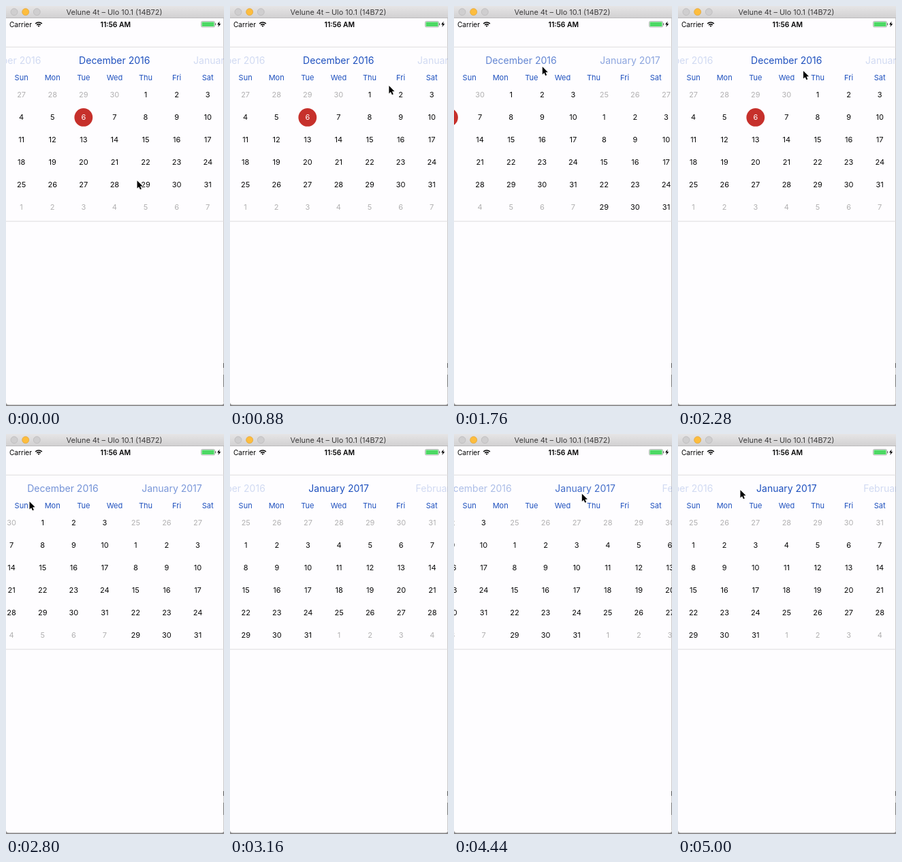
Recreate the animation shown at these times as an HTML page with a canvas. Size 320x587 px, loop 5040 ms.

```html
<!DOCTYPE html>
<html lang="en">
<head>
<meta charset="utf-8">
<title>Calendar paging</title>
<style>
html, body { margin: 0; width: 100%; height: 100%; overflow: hidden; background: #fefdff; }
canvas { display: block; width: 320px; height: 587px; }
</style>
</head>
<body>
<canvas id="stage" width="320" height="587"></canvas>
<script>
const ctx = document.getElementById('stage').getContext('2d');
const LOOP = 5040, STEP = 40, PAGE = 319, TITLE_GAP = 160;
const BLUE = '#1e50be', PAPER = '#fefdff', RULE = '#dddcde';
const WEEKDAYS = ['Sun', 'Mon', 'Tue', 'Wed', 'Thu', 'Fri', 'Sat'];
const MONTHS = ['November', 'December', 'January', 'February'];

const linear = u => u;
const settle = u => 1 - (1 - u) ** 3;
const smooth = u => u * u * (3 - 2 * u);

// Keys: [time, value(s)..., easing towards this key]
const scrollKeys = [
  [0, 0], [1180, 0], [1480, 131, linear], [1620, 155, settle],
  [1950, 68, smooth], [2240, 0, settle], [2340, 0],
  [2800, 151.3, linear], [2880, 199, linear], [3220, PAGE, settle],
  [4000, PAGE], [4080, 293, linear], [4300, 210, settle],
  [4680, 349, smooth], [4960, PAGE, settle], [LOOP, PAGE]
];
const cursorKeys = [
  [0, 192, 255], [560, 205, 162, smooth], [1120, 251, 86, smooth],
  [1180, 251, 86], [1480, 119, 84, linear], [1620, 95, 84, settle],
  [1950, 183.5, 94, smooth], [2340, 183.5, 94],
  [2800, 34, 98, linear], [2900, -14, 104, linear],
  [3200, -14, 112], [3380, 14, 114, linear], [3700, 184, 90, smooth],
  [3960, 121, 87, smooth], [4000, 121, 87], [4080, 147, 88, linear],
  [4300, 230, 89, settle], [4680, 91, 81, smooth], [LOOP, 91, 81]
];

function sample(keys, t, index = 1) {
  const i = Math.max(1, keys.findIndex(k => k[0] >= t));
  const a = keys[i - 1], b = keys[i];
  const last = b[b.length - 1];
  const ease = typeof last === 'function' ? last : linear;
  return a[index] + (b[index] - a[index]) * ease((t - a[0]) / (b[0] - a[0]));
}

function buildMonth(n) {
  const month = 10 + n;
  const lead = new Date(2016, month, 1).getDay() || 7;
  const days = Array.from({ length: 42 }, (_, i) => {
    const date = new Date(2016, month, 1 - lead + i);
    return {
      label: date.getDate(),
      inside: date.getMonth() === month % 12,
      today: date.getFullYear() === 2016 && date.getMonth() === 11 && date.getDate() === 6
    };
  });
  return { name: MONTHS[n] + ' ' + (month < 12 ? 2016 : 2017), days };
}
const months = MONTHS.map((_, n) => buildMonth(n));

function text(str, x, y, size, color, weight = 400, align = 'center') {
  ctx.font = `${weight} ${size}px Inter, sans-serif`;
  ctx.textAlign = align;
  ctx.fillStyle = color;
  ctx.fillText(str, x, y);
}

function rect(x, y, w, h, color) {
  ctx.fillStyle = color;
  ctx.fillRect(x, y, w, h);
}

function disc(x, y, r, fill, stroke) {
  ctx.beginPath();
  ctx.arc(x, y, r, 0, Math.PI * 2);
  ctx.fillStyle = fill;
  ctx.fill();
  if (stroke) {
    ctx.lineWidth = 0.7;
    ctx.strokeStyle = stroke;
    ctx.stroke();
  }
}

function polygon(points, x, y, scale = 1) {
  ctx.beginPath();
  points.forEach(([px, py]) => ctx.lineTo(x + px * scale, y + py * scale));
  ctx.closePath();
}

function drawWindow() {
  rect(0, 0, 320, 587, '#8c8b8c');
  ctx.beginPath();
  ctx.roundRect(0, -10, 320, 595.3, 4);
  ctx.fillStyle = PAPER;
  ctx.fill();
  rect(319, 18, 1, 564, '#c9c8ca');
  rect(319, 524, 1, 7, '#555');
  rect(319, 541, 1, 18, '#777');
}

function drawTitleBar() {
  const shade = ctx.createLinearGradient(0, 0, 0, 17);
  shade.addColorStop(0, '#e6e5e6');
  shade.addColorStop(1, '#d2d1d2');
  rect(0, 0, 320, 17, shade);
  rect(0, 17, 320, 1, '#bcbbbc');
  disc(12, 8.7, 5, '#cfcecf', '#b8b7b8');
  disc(28.7, 8.7, 5, '#fdbd3e', '#e0a336');
  disc(45.3, 8.7, 5, '#cfcecf', '#b8b7b8');
  text('Velune 4t – Ulo 10.1 (14B72)', 159, 12.8, 10.9, '#3c3b3c');
}

function drawWifi(x, y) {
  ctx.strokeStyle = '#000';
  ctx.lineWidth = 1.6;
  for (const r of [4, 6.8]) {
    ctx.beginPath();
    ctx.arc(x, y, r, -Math.PI * 0.75, -Math.PI * 0.25);
    ctx.stroke();
  }
  ctx.beginPath();
  ctx.moveTo(x, y);
  ctx.arc(x, y, 2.1, -Math.PI * 0.75, -Math.PI * 0.25);
  ctx.fillStyle = '#000';
  ctx.fill();
}

function drawStatusBar() {
  text('Carrier', 5, 30.6, 10.1, '#000', 400, 'left');
  drawWifi(48, 30.8);
  text('11:56 AM', 160.8, 30.6, 10.3, '#000', 600);
  ctx.beginPath();
  ctx.roundRect(286.5, 22.5, 20, 8.5, 1.8);
  ctx.lineWidth = 0.7;
  ctx.strokeStyle = '#999';
  ctx.stroke();
  rect(287.5, 23.5, 18, 6.5, '#4cd964');
  rect(307, 25.2, 1.2, 3, '#777');
  polygon([[3.6, 0], [0, 4.8], [2.3, 4.8], [1.3, 8.4], [5.2, 3.4], [2.9, 3.4]], 310, 22.5);
  ctx.fillStyle = '#000';
  ctx.fill();
}

function drawCalendar(scroll) {
  rect(0, 59.7, 320, 1, RULE);
  rect(0, 315.5, 320, 1, RULE);
  months.forEach((month, n) => {
    const page = n - 1 - scroll / PAGE;
    if (Math.abs(page) >= 2) return;
    ctx.globalAlpha = Math.max(0.2, 1 - 0.8 * Math.abs(page));
    text(month.name, 159.3 + page * TITLE_GAP, 84.9, 14, BLUE);
    ctx.globalAlpha = 1;
    month.days.forEach((day, i) => {
      const x = 22.6 + (i % 7) * 45.6 + page * PAGE;
      const y = 130.5 + Math.floor(i / 7) * 32.9;
      if (x < -20 || x > 340) return;
      if (day.today) disc(x, y, 13.4, '#c6302b');
      text(day.label, x, y + 3.7, 11, day.today ? '#fff' : day.inside ? '#080808' : '#b1b0b1');
    });
  });
  WEEKDAYS.forEach((name, i) => text(name, 22.6 + i * 45.6, 109.2, 11, BLUE));
}

function drawCursor(x, y) {
  polygon([[0, 0], [0, 13.5], [3.1, 10.7], [5.3, 15.6], [7.6, 14.6], [5.4, 9.8], [9.6, 9.6]],
    x + 0.5, y + 1.2, 0.84);
  ctx.lineJoin = 'round';
  ctx.lineWidth = 1.6;
  ctx.strokeStyle = '#fff';
  ctx.stroke();
  ctx.fillStyle = '#000';
  ctx.fill();
}

function drawFrame(t) {
  drawWindow();
  drawTitleBar();
  drawStatusBar();
  drawCalendar(sample(scrollKeys, t));
  drawCursor(sample(cursorKeys, t), sample(cursorKeys, t, 2));
}

const start = performance.now();
function tick() {
  const elapsed = (performance.now() - start) % LOOP;
  drawFrame(Math.floor(elapsed / STEP) * STEP);
  requestAnimationFrame(tick);
}
tick();
</script>
</body>
</html>
```
